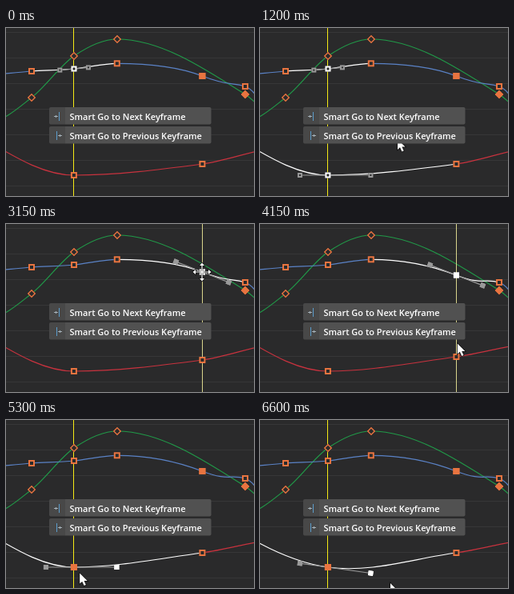
Recreate the animation shown at these times as an HTML page with a canvas. Size 310 px wide and 210 px high, loop 6.65 s.

```html
<!DOCTYPE html>
<html lang="en">
<head>
<meta charset="utf-8">
<title>Graph editor</title>
<style>
html, body { margin: 0; width: 100%; height: 100%; overflow: hidden; background: #2a2a2b; }
canvas { display: block; width: 310px; height: 210px; }
</style>
</head>
<body>
<canvas id="stage" width="310" height="210"></canvas>
<script>
const ctx = document.getElementById('stage').getContext('2d');
const LOOP = 6650, STEP = 50;
const BACK = '#2a2a2b', ORANGE = '#e87440', WHITE = '#fff', GREY = '#999';
const GREEN = '#209a48', BLUE = '#5a82c6', RED = '#c8323e';

// Times of the main events
const FIRST_JUMP = 1750, SECOND_JUMP = 2350, PICK_RED = 4300, GO_BACK = 5200;

// Cursor moves: from, to, x, y
const MOVES = [
  [250, 550, 86, 186], [650, 900, 161, 137], [1050, 1200, 171, 137],
  [1500, 1550, 201, 138], [2450, 3000, 245, 60], [3150, 3350, 245, 64],
  [3750, 4300, 246, 166], [4500, 4700, 263, 184], [4800, 4970, 86, 190],
  [5250, 5500, 136, 186], [5550, 5850, 141, 188], [5850, 5950, 141, 195],
  [6150, 6300, 166, 206], [6450, 6600, 162, 202]
];

const ramp = (t, a, b) => Math.max(0, Math.min(1, (t - a) / (b - a)));
const smooth = u => u * u * (3 - 2 * u);
const within = (t, a, b) => t >= a && t < b;
const knot = (x, y, more) => ({ x, y, ...more });

function cursorAt(t) {
  let x = 112, y = 212;
  for (const [from, to, tx, ty] of MOVES) {
    const u = smooth(ramp(t, from, to));
    x += (tx - x) * u;
    y += (ty - y) * u;
  }
  return [x, y];
}

// Handles reach a third of the way; extremes and ends are flat unless given
function withHandles(knots) {
  return knots.map((k, i) => {
    const prev = knots[i - 1] || k, next = knots[i + 1] || k;
    const monotone = (k.y - prev.y) * (next.y - k.y) > 0;
    const auto = monotone ? (next.y - prev.y) / (next.x - prev.x) : 0;
    const slope = k.slope ?? auto;
    const before = k.reach || (k.x - prev.x) / 3;
    const after = k.reach || (next.x - k.x) / 3;
    return {
      ...k,
      a: [k.x - before, k.y - slope * before],
      b: [k.x + after, k.y + slope * after]
    };
  });
}

function drawCurve(knots, color, active) {
  ctx.lineWidth = 1.2;
  for (let i = 1; i < knots.length; i++) {
    const p = knots[i - 1], q = knots[i];
    ctx.strokeStyle = active && (p === active || q === active) ? WHITE : color;
    ctx.beginPath();
    ctx.moveTo(p.x, p.y);
    ctx.bezierCurveTo(...p.b, ...q.a, q.x, q.y);
    ctx.stroke();
  }
}

function mark(x, y, r, color, { filled = false, turn = 0, line = 2 } = {}) {
  ctx.save();
  ctx.translate(x, y);
  ctx.rotate(turn);
  ctx.fillStyle = filled ? color : BACK;
  ctx.strokeStyle = color;
  ctx.lineWidth = line;
  ctx.fillRect(-r, -r, 2 * r, 2 * r);
  const inner = r - line / 2;
  ctx.strokeRect(-inner, -inner, 2 * inner, 2 * inner);
  ctx.restore();
}

function drawHandles({ x, y, a, b, filled, grabbed }) {
  ctx.strokeStyle = GREY;
  ctx.lineWidth = 1.2;
  ctx.beginPath();
  ctx.moveTo(...a);
  ctx.lineTo(x, y);
  ctx.lineTo(...b);
  ctx.stroke();
  const turn = filled ? Math.atan2(b[1] - a[1], b[0] - a[0]) : 0;
  mark(...a, 3, GREY, { filled, turn });
  mark(...b, 3, grabbed ? WHITE : GREY, { filled, turn });
}

function drawKeys(knots, active) {
  for (const k of knots) {
    const lit = k === active && !k.grabbed;
    mark(k.x, k.y, lit ? 3.5 : 4, lit ? WHITE : ORANGE, { filled: k.filled });
  }
}

function scene(t) {
  const shift = 4 * smooth(ramp(t, 3150, 3350));
  const tilt = ramp(t, 5850, 5950);
  const back = t >= GO_BACK;

  const green = withHandles([
    knot(-21, 117), knot(32, 87), knot(85, 35), knot(139, 14),
    knot(299, 83, { filled: true }), knot(406, 185)
  ]);
  const blue = withHandles([
    knot(-21, 58), knot(32, 54), knot(85, 51), knot(138.8, 44.3),
    knot(245.4, 60 + shift, { slope: 0.39, reach: 33, filled: true }),
    knot(299, 73, { slope: 0.3 }), knot(353, 130)
  ]);
  const red = withHandles([
    knot(-20, 143, { slope: 0.6 }),
    knot(84.9, 184, { slope: 0.14 * tilt, filled: back, grabbed: back }),
    knot(245.4, 170 - shift), knot(356, 148)
  ]);

  const blueActive = t < FIRST_JUMP ? blue[2] : t < SECOND_JUMP ? blue[3]
    : t < PICK_RED ? blue[4] : null;
  const redActive = within(t, 600, FIRST_JUMP) || back ? red[1]
    : t >= PICK_RED ? red[2] : null;
  const head = (blueActive && t < FIRST_JUMP) || back ? red[1].x : (blueActive || redActive).x;
  return { green, blue, red, blueActive, redActive, head };
}

function drawGrid() {
  ctx.fillStyle = BACK;
  ctx.fillRect(0, 0, 310, 210);
  ctx.fillStyle = '#373738';
  for (let y = 5; y < 210; y += 32) ctx.fillRect(0, y, 310, 1);
}

function drawGraph({ green, blue, red, blueActive, redActive, head }) {
  drawCurve(green, GREEN);
  drawCurve(blue, BLUE, blueActive);
  drawCurve(red, RED, redActive);

  ctx.fillStyle = head > 200 ? '#d8d48c' : '#f6ea16';
  ctx.fillRect(Math.floor(head), 0, 1, 210);

  for (const k of green) {
    mark(k.x, k.y, 3.7, ORANGE, { filled: k.filled, turn: Math.PI / 4, line: 1.4 });
  }
  if (blueActive) drawHandles(blueActive);
  if (redActive) drawHandles(redActive);
  drawKeys(blue, blueActive);
  drawKeys(red, redActive);
}

function poly(points, line) {
  ctx.beginPath();
  points.forEach(p => ctx.lineTo(...p));
  ctx.closePath();
  ctx.strokeStyle = '#111';
  ctx.fillStyle = WHITE;
  ctx.lineWidth = line;
  ctx.stroke();
  ctx.fill();
}

function drawArrow() {
  poly([[1, 2], [1, 15], [4, 12.3], [6.4, 17.5], [8.7, 16.5], [6.4, 11.5], [10.5, 11.5]], 1.6);
}

function drawCross() {
  for (let i = 0; i < 4; i++) {
    ctx.rotate(Math.PI / 2);
    poly([[0.6, -2], [0.6, -8], [3, -8], [0, -11.5], [-3, -8], [-0.6, -8], [-0.6, -2]], 1.4);
  }
  ctx.fillStyle = WHITE;
  ctx.fillRect(-3, -0.6, 6, 1.2);
  ctx.fillRect(-0.6, -3, 1.2, 6);
}

// A move cursor shows over anything that can be dragged
function drawCursor(t, { blueActive, redActive }) {
  if (t < 250) return;
  const [x, y] = cursorAt(t);
  const near = k => k && [[k.x, k.y], k.b].some(p => Math.hypot(p[0] - x, p[1] - y) < 6);
  ctx.save();
  ctx.translate(x, y);
  if (near(blueActive) || near(redActive)) drawCross(); else drawArrow();
  ctx.restore();
}

function drawButton(y, label, dir, lit) {
  ctx.save();
  ctx.beginPath();
  ctx.roundRect(54, y, 202.5, 21.5, 2);
  ctx.clip();
  ctx.fillStyle = '#484848';
  ctx.fillRect(54, y, 20, 22);
  ctx.fillStyle = lit ? '#5486aa' : '#515151';
  ctx.fillRect(74, y, 183, 22);
  ctx.restore();

  const bar = dir > 0 ? 66 : 63, mid = y + 11;
  const tick = (from, size, dy, h) =>
    ctx.fillRect(dir > 0 ? bar - from - size : bar + 1 + from, mid + dy, size, h);
  ctx.fillStyle = lit ? WHITE : '#5b9ccb';
  ctx.fillRect(bar, mid - 5, 1, 11);
  ctx.fillStyle = lit ? WHITE : '#a5b0b8';
  tick(1, 5, 0, 1);
  tick(3, 1, -1, 3);

  ctx.fillStyle = WHITE;
  ctx.font = '600 11px "Open Sans", "Noto Sans", sans-serif';
  ctx.fillText(label, 79.5, y + 16);
}

function draw(t) {
  const state = scene(t);
  const pressed = within(t, 1500, 1850) || within(t, 2050, 2450);
  drawGrid();
  drawGraph(state);
  drawCursor(t, state);
  drawButton(99, 'Smart Go to Next Keyframe', 1, pressed);
  drawButton(123, 'Smart Go to Previous Keyframe', -1, false);
}

const start = performance.now();
function tick() {
  const t = (performance.now() - start) % LOOP;
  draw(Math.floor(t / STEP) * STEP);
  requestAnimationFrame(tick);
}
tick();
</script>
</body>
</html>
```
